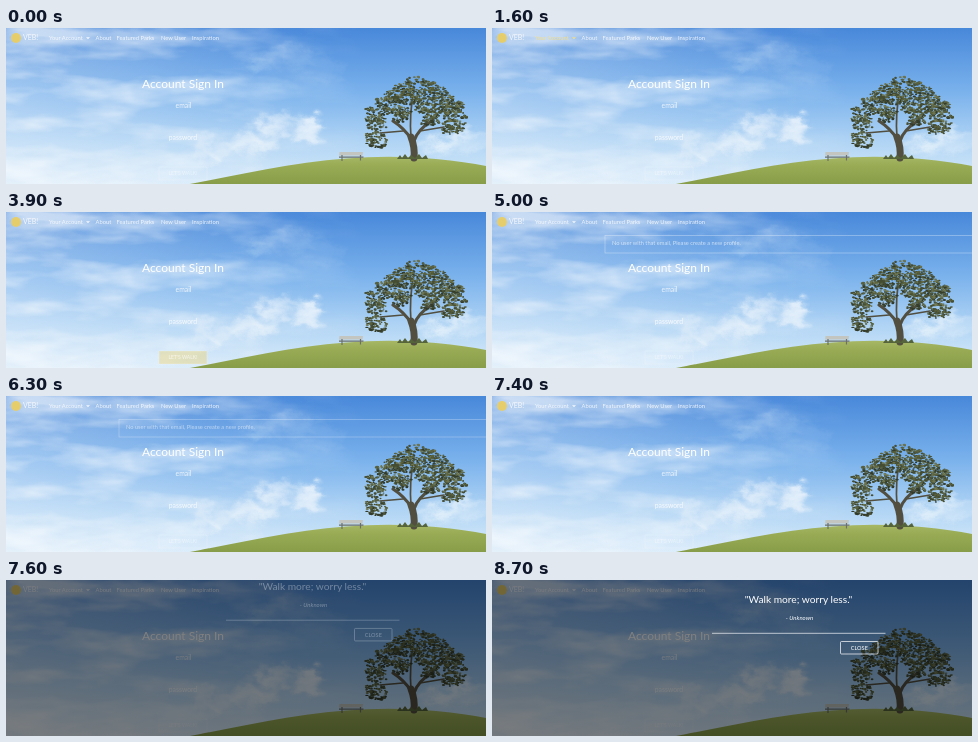
These frames come from a looping animation (480 px wide and 156 px high, 8800 ms). An HTML page:

```html
<!DOCTYPE html>
<html lang="en">
<head>
<meta charset="utf-8">
<title>Account Sign In</title>
<style>
  html, body { margin: 0; width: 100%; height: 100%; overflow: hidden; background: #8fc0f0; }
  svg { display: block; width: 100%; height: 100%; }
  text { font-family: Lato, "Open Sans", sans-serif; fill: #fff; }
  filter { color-interpolation-filters: sRGB; }
  .nav { font-size: 5.8px; }
  .mid { text-anchor: middle; }
  .label { font-size: 6.8px; opacity: .85; }
  .box { fill: none; stroke: #fff; stroke-width: .7; }
</style>
</head>
<body>
<svg viewBox="0 0 480 156" preserveAspectRatio="none">
  <defs>
    <linearGradient id="sky" x2="0" y2="1">
      <stop offset="0" stop-color="#4888da"/>
      <stop offset=".4" stop-color="#79b1ec"/>
      <stop offset=".75" stop-color="#b3d6f5"/>
      <stop offset="1" stop-color="#d9ebfa"/>
    </linearGradient>
    <linearGradient id="haze">
      <stop offset="0" stop-color="#fff" stop-opacity=".3"/>
      <stop offset=".4" stop-color="#fff" stop-opacity=".1"/>
      <stop offset=".65" stop-color="#fff" stop-opacity="0"/>
    </linearGradient>
    <linearGradient id="streakFade">
      <stop offset="0" stop-color="#fff" stop-opacity=".6"/>
      <stop offset=".4" stop-color="#fff" stop-opacity=".5"/>
      <stop offset=".75" stop-color="#fff" stop-opacity="0"/>
    </linearGradient>
    <linearGradient id="grass" x2="0" y2="1">
      <stop offset="0" stop-color="#a7b764"/>
      <stop offset=".35" stop-color="#98aa54"/>
      <stop offset="1" stop-color="#889d49"/>
    </linearGradient>
    <filter id="streaks" x="0" y="0" width="1" height="1">
      <feTurbulence type="fractalNoise" baseFrequency=".012 .04" numOctaves="4" seed="5"/>
      <feColorMatrix values="0 0 0 0 1  0 0 0 0 1  0 0 0 0 1  2.4 0 0 0 -.95"/>
      <feComposite in2="SourceGraphic" operator="in"/>
    </filter>
    <filter id="puffy" x="-10%" y="-20%" width="120%" height="140%">
      <feGaussianBlur stdDeviation="3" result="soft"/>
      <feTurbulence type="fractalNoise" baseFrequency=".06 .09" numOctaves="4" seed="7"/>
      <feDisplacementMap in="soft" scale="22" xChannelSelector="R" yChannelSelector="G"/>
    </filter>
  </defs>

  <g id="scene">
    <rect width="480" height="156" fill="url(#sky)"/>
    <rect width="480" height="156" fill="url(#haze)"/>
    <rect width="480" height="156" fill="url(#streakFade)" filter="url(#streaks)"/>
    <g id="clouds" fill="#f6f9fd" filter="url(#puffy)"></g>
    <path d="M184 156C232 147 288 134 340 130.500Q386 127 430 131Q460 134 480 138V156Z" fill="url(#grass)"/>
    <path d="M333.500 124H357L356.500 127.500H333Z" fill="#c3c6c0"/>
    <path d="M333 129.200H357.500M336 127V133M354.500 127V132.500" fill="none" stroke="#6d706a" stroke-width="1.200"/>
    <g fill="none" stroke="#524f40" stroke-linecap="round">
      <path d="M408 130Q409 119 405 109" stroke-width="7"/>
      <path d="M406 112Q398 100 387 93M408 113Q412 101 427 92" stroke-width="3.200"/>
      <path d="M405 110Q403 86 408 62M397 103L374 105M414 103L438 99" stroke-width="1.700"/>
    </g>
    <g id="leaves"></g>
    <path d="M391 131l3-4 2 3 3-4 3 4 3-3 4 3 4-4 3 4 4-3 2 4Z" fill="#55643a"/>
  </g>

  <g opacity=".85">
    <circle cx="10" cy="10" r="5" fill="#efcd55"/>
    <text x="17" y="12.4" font-size="7">VEB!</text>
    <text id="account" class="nav" x="43" y="12">Your Account</text>
    <path id="caret" d="M80 9.200h4l-2 2Z"/>
    <text class="nav" x="89.5" y="12">About</text>
    <text class="nav" x="110.5" y="12">Featured Parks</text>
    <text class="nav" x="155" y="12">New User</text>
    <text class="nav" x="186" y="12">Inspiration</text>
  </g>

  <text class="mid" x="177" y="60" font-size="12">Account Sign In</text>
  <text class="mid label" x="177.5" y="80">email</text>
  <text class="mid label" x="177" y="112">password</text>
  <rect id="button" class="box" x="153" y="139" width="48" height="13" stroke-opacity=".28"/>
  <text id="buttonText" class="mid" x="177" y="147.4" font-size="5">LET'S WALK!</text>

  <g id="alert">
    <rect class="box" x="113" y="23.5" width="387" height="17.5" stroke-opacity=".65"/>
    <text x="120" y="33" font-size="5.7">No user with that email, Please create a new profile.</text>
  </g>

  <rect id="backdrop" width="480" height="156"/>
  <g id="modal">
    <text class="mid" x="306.5" y="23" font-size="10.2">"Walk more; worry less."</text>
    <text class="mid" x="307.5" y="40.3" font-size="6" font-style="italic">- Unknown</text>
    <path d="M220 53.3H393.5" stroke="#dfe4ea" stroke-width=".8"/>
    <rect class="box" x="348.5" y="61.5" width="37.5" height="12.5" rx="1"/>
    <text class="mid" x="367.3" y="69.8" font-size="5.6">CLOSE</text>
  </g>
</svg>
<script>
const LOOP = 8800;
const $ = id => document.getElementById(id);
const ellipse = (parent, attrs) => {
  const node = document.createElementNS(parent.namespaceURI, 'ellipse');
  for (const key in attrs) node.setAttribute(key, attrs[key]);
  parent.append(node);
};

let seed = 11;
const random = () => (seed = seed * 16807 % 2147483647) / 2147483647;
const between = (low, high) => low + (high - low) * random();
const pointIn = (x, y, w, h) => {
  const angle = between(0, 2 * Math.PI), reach = Math.sqrt(random());
  return { cx: x + Math.cos(angle) * reach * w, cy: y + Math.sin(angle) * reach * h };
};

function cloudBank(x, y, w, h, opacity) {
  for (let i = 0; i < 12; i++) {
    ellipse($('clouds'), {
      ...pointIn(x, y, w, h), rx: w * between(.2, .4), ry: h * between(.25, .5), opacity
    });
  }
}
cloudBank(284, 100, 38, 12, .5);
cloudBank(228, 118, 36, 14, .34);
cloudBank(285, 38, 48, 20, .08);
cloudBank(450, 114, 42, 9, .4);

const greens = ['#333b2a', '#454d33', '#59613f', '#6d744d', '#868b66'];

function leafClump({ cx, cy }) {
  const w = between(9, 14), h = between(4, 6.5);
  for (let i = 0; i < w * h * .8; i++) {
    const leaf = pointIn(cx, cy, w, h);
    const light = 1.6 - (leaf.cy - cy) / h * 1.3 + between(-1, 1.4);
    ellipse($('leaves'), {
      ...leaf, rx: between(.8, 1.8), ry: between(.6, 1.2),
      fill: greens[Math.max(0, Math.min(4, Math.floor(light)))]
    });
  }
}

// The crown narrows to the top and sits lower on the left; the fork stays open.
const TIERS = 9;
for (let tier = 0; tier < TIERS; tier++) {
  const rise = tier / (TIERS - 1);
  const half = 4 + 34 * Math.sin(Math.min(1, rise * 1.4) * Math.PI / 2);
  const clumps = 1 + Math.round(half / 11);
  for (let i = 0; i < clumps; i++) {
    const side = clumps > 1 ? i / (clumps - 1) * 2 - 1 : 0;
    const cx = 409 + side * half + between(-3, 3);
    const cy = 51 + rise * (57 - 6 * side) + between(-2, 2);
    if (cy < 95 || Math.abs(cx - 408) > 18) leafClump({ cx, cy });
  }
}

const ramp = (t, start, end) => Math.min(1, Math.max(0, (t - start) / (end - start)));
const pulse = (t, inStart, inEnd, outStart, outEnd) =>
  ramp(t, inStart, inEnd) - ramp(t, outStart, outEnd);
const easeOut = x => 1 - (1 - x) ** 2;

function draw() {
  const t = performance.now() % LOOP;

  const hover = pulse(t, 0, 700, 2900, 3300);
  $('account').style.fill = $('caret').style.fill =
    `rgb(255,${255 - 31 * hover},${255 - 140 * hover})`;

  const press = t < 4500 ? ramp(t, 3500, 4400) : 0;
  $('button').style.fill = `rgba(239,205,85,${.8 * press})`;
  $('buttonText').style.opacity = .5 + .5 * press;

  $('alert').style.opacity = pulse(t, 4400, 5300, 5900, 6800);

  $('backdrop').style.opacity = .5 * ramp(t, 7420, 7540);
  $('modal').style.opacity = ramp(t, 7550, 7700);
  $('modal').setAttribute('transform', `translate(0 ${-19 * (1 - easeOut(ramp(t, 7550, 7850)))})`);

  requestAnimationFrame(draw);
}
draw();
</script>
</body>
</html>
```
